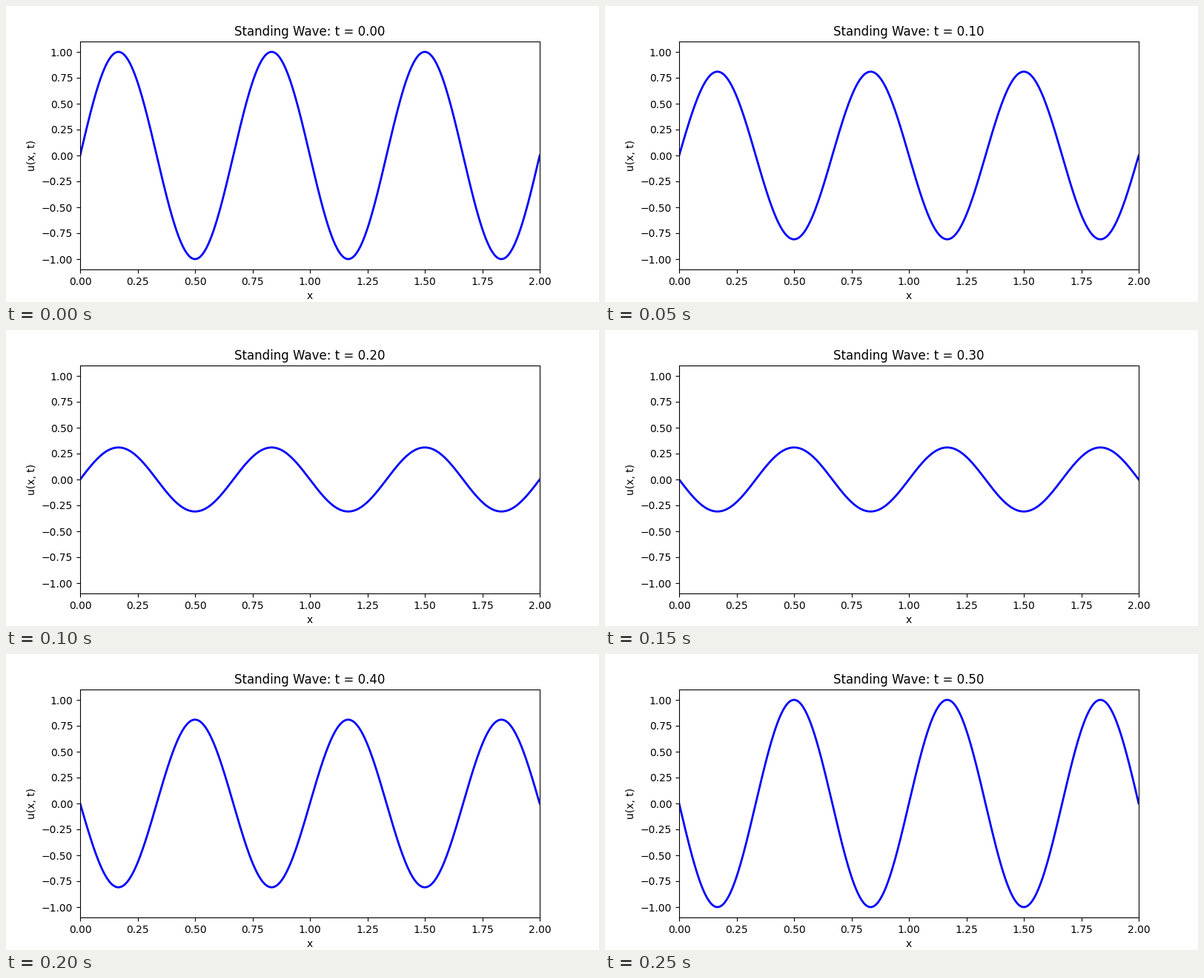
A matplotlib script that plays this animation: 800x400 px, repeating every 300 ms.

```python
import numpy as np
import matplotlib.pyplot as plt
from matplotlib.animation import FuncAnimation

LENGTH = 2.0
HALF_WAVES = 6
FRAMES = 6
INTERVAL = 50  # ms
TIME_STEP = 0.1

x = np.linspace(0, LENGTH, 500)
shape = np.sin(HALF_WAVES * np.pi * x / LENGTH)

fig, ax = plt.subplots(figsize=(8, 4), dpi=100)
line, = ax.plot(x, shape, color="blue", linewidth=2)
ax.set_xlim(0, LENGTH)
ax.set_ylim(-1.1, 1.1)
ax.set_xlabel("x")
ax.set_ylabel("u(x, t)")
title = ax.set_title("")


def update(frame):
    t = frame * TIME_STEP
    line.set_ydata(shape * np.cos(2 * np.pi * t))
    title.set_text(f"Standing Wave: t = {t:.2f}")
    return line, title


anim = FuncAnimation(fig, update, frames=FRAMES, interval=INTERVAL, repeat=True)
plt.show()
```
